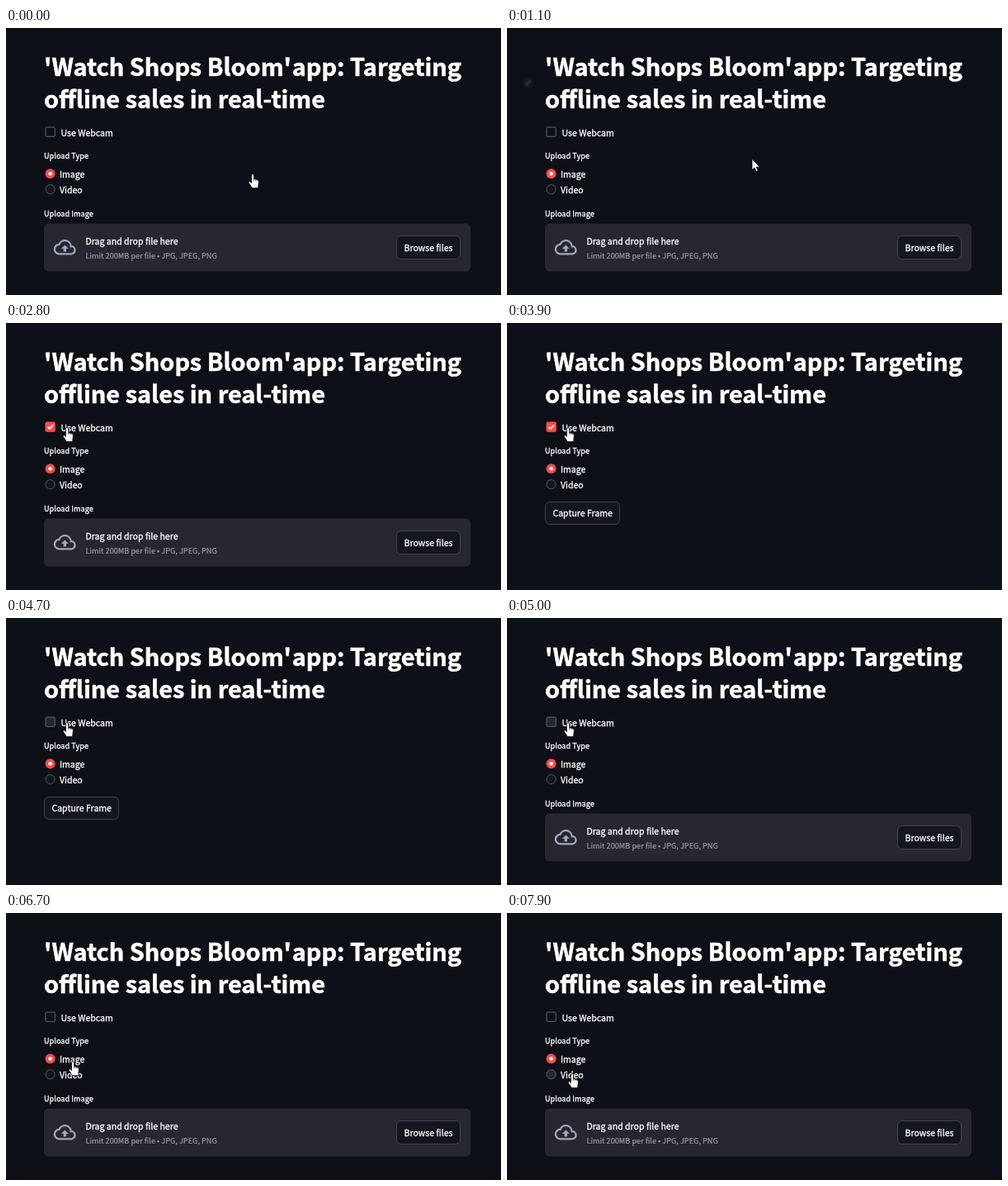
An HTML page for the animation above (8 s loop, 600 px wide and 323 px high).

```html
<!DOCTYPE html>
<html lang="en">
<head>
<meta charset="utf-8">
<style>
html, body { margin: 0; width: 100%; height: 100%; overflow: hidden; background: #0d1017; }
svg { display: block; width: 600px; height: 323px; }
text { font: 10.56px "Noto Sans CJK JP", "Noto Sans CJK SC", "Noto Sans CJK", "Noto Sans", sans-serif;
  fill: #fff; stroke: #fff; stroke-width: .3px; }
.title { font-size: 28.9px; font-weight: 700; stroke-width: .6px; }
.small { font-size: 9.2px; }
.muted { fill: #a0a1a8; stroke: #a0a1a8; stroke-width: .15px; }
.end { text-anchor: end; }
.mid { text-anchor: middle; }
.button { fill: #13151f; stroke: #41434c; }
</style>
</head>
<body>
<svg viewBox="0 0 600 323">
  <g id="link" fill="none" stroke="#4b4e57" stroke-linecap="round">
    <circle cx="25.5" cy="66.5" r="6.5" fill="#14171f" stroke="none"/>
    <g transform="translate(25.5 66.5) rotate(-45)">
      <path d="M-.6-1.4H-2a1.4 1.4 0 0 0 0 2.8H-.6M.6-1.4H2a1.4 1.4 0 0 1 0 2.8H.6M-1.3 0H1.3" stroke-width=".8"/>
    </g>
  </g>

  <text class="title" x="46" y="58">'Watch Shops Bloom'</text>
  <text class="title end" x="552" y="58">app: Targeting</text>
  <text class="title" x="46" y="96.6">offline sales in real-time</text>

  <rect id="box" x="48" y="120" width="11.3" height="11.3" rx="1.2"/>
  <path id="tick" d="M50.6 125.6l2.3 2.4 4.2-4.6" fill="none" stroke="#fff" stroke-width="1.6"/>
  <text x="66.5" y="130.7">Use Webcam</text>

  <text class="small" x="46" y="157.6">Upload Type</text>
  <circle cx="53.6" cy="176.2" r="6" fill="#ff4b4b"/>
  <circle cx="53.6" cy="176.2" r="2.3" fill="#fff"/>
  <text x="65" y="180.6">Image</text>
  <circle id="video" cx="53.6" cy="195.2" r="5.6" stroke="#565962"/>
  <text x="65" y="199.5">Video</text>

  <g id="upload">
    <text class="small" x="46" y="228.2">Upload Image</text>
    <rect x="46" y="236.5" width="517" height="58" rx="5.5" fill="#262730"/>
    <g transform="translate(57.8 251.8) scale(1.13)">
      <path d="M6 19a5 5 0 0 1-.1-10A6.5 6.5 0 0 1 18.5 11a4 4 0 0 1 .5 8z" fill="none" stroke="#a3a8b8" stroke-width="2"/>
      <path d="M8 13.5h2.5v3h3v-3H16l-4-4z" fill="#a3a8b8"/>
    </g>
    <text x="96.5" y="261.5">Drag and drop file here</text>
    <text class="small muted" x="96.5" y="279">Limit 200MB per file • JPG, JPEG, PNG</text>
    <rect class="button" x="473.5" y="251.5" width="77" height="28" rx="5.5"/>
    <text class="mid" x="512" y="269.5">Browse files</text>
  </g>

  <g id="capture">
    <rect class="button" x="46.5" y="216.5" width="90" height="27" rx="5.5"/>
    <text class="mid" x="91.7" y="233.7">Capture Frame</text>
  </g>

  <g id="cursor" fill="#fff" stroke="#0d1017" stroke-width=".8" stroke-linejoin="round">
    <path id="arrow" d="M0-.5V12.8l3-2.8 2 4.6 2.3-1-2-4.4h4.2z"/>
    <g id="hand">
      <path d="M-1.5 1a1.5 1.5 0 0 1 3 0V5.6l4.3 1q1.7.5 1.6 2.2L6.6 16.5H-.6L-4.6 10.4q-.6-1.9 1-1.7l2.1 1.7z"/>
      <path d="M1.5 5.6v2.5M3.8 6.2v2M5.8 6.8v1.8" fill="none" stroke-width=".6"/>
    </g>
  </g>
</svg>
<script>
const LOOP = 8000;
// Pointer stops: time, x, y
const stops = [
  [0, 299, 177], [250, 299, 177], [650, 300, 95], [850, 300, 95], [1100, 297, 159],
  [1300, 297, 159], [2100, 74, 127], [5600, 74, 127], [6300, 81, 180],
  [7200, 81, 180], [7550, 79, 195], [LOOP, 79, 195]
];
const el = id => document.getElementById(id);
const show = (id, on) => { el(id).style.display = on ? '' : 'none'; };
const ease = u => u * u * (3 - 2 * u);

function pointer(t) {
  const i = stops.findIndex(s => s[0] > t);
  const [t0, x0, y0] = stops[i - 1], [t1, x1, y1] = stops[i];
  const u = ease((t - t0) / (t1 - t0));
  return [x0 + (x1 - x0) * u, y0 + (y1 - y0) * u];
}

function draw(t) {
  const [x, y] = pointer(t);
  const onCheck = y > 118 && y < 140 && x < 132;
  const hand = onCheck || (y > 166 && y < 205);
  const checked = t >= 2400 && t < 4500;
  const webcam = t >= 3300 && t < 4800;

  el('cursor').setAttribute('transform', `translate(${x} ${y})`);
  show('hand', hand);
  show('arrow', !hand);
  show('link', t >= 500 && t < 1200);
  show('tick', checked);
  show('capture', webcam);
  show('upload', !webcam);
  el('box').setAttribute('fill', checked ? '#ff4b4b' : onCheck ? '#262730' : '#0d1017');
  el('box').setAttribute('stroke', checked ? '#ff4b4b' : '#62656e');
  el('video').setAttribute('fill', t >= 7600 ? '#262730' : '#13151f');
}

function frame(now) {
  draw(now % LOOP);
  requestAnimationFrame(frame);
}
draw(0);
requestAnimationFrame(frame);
</script>
</body>
</html>
```
